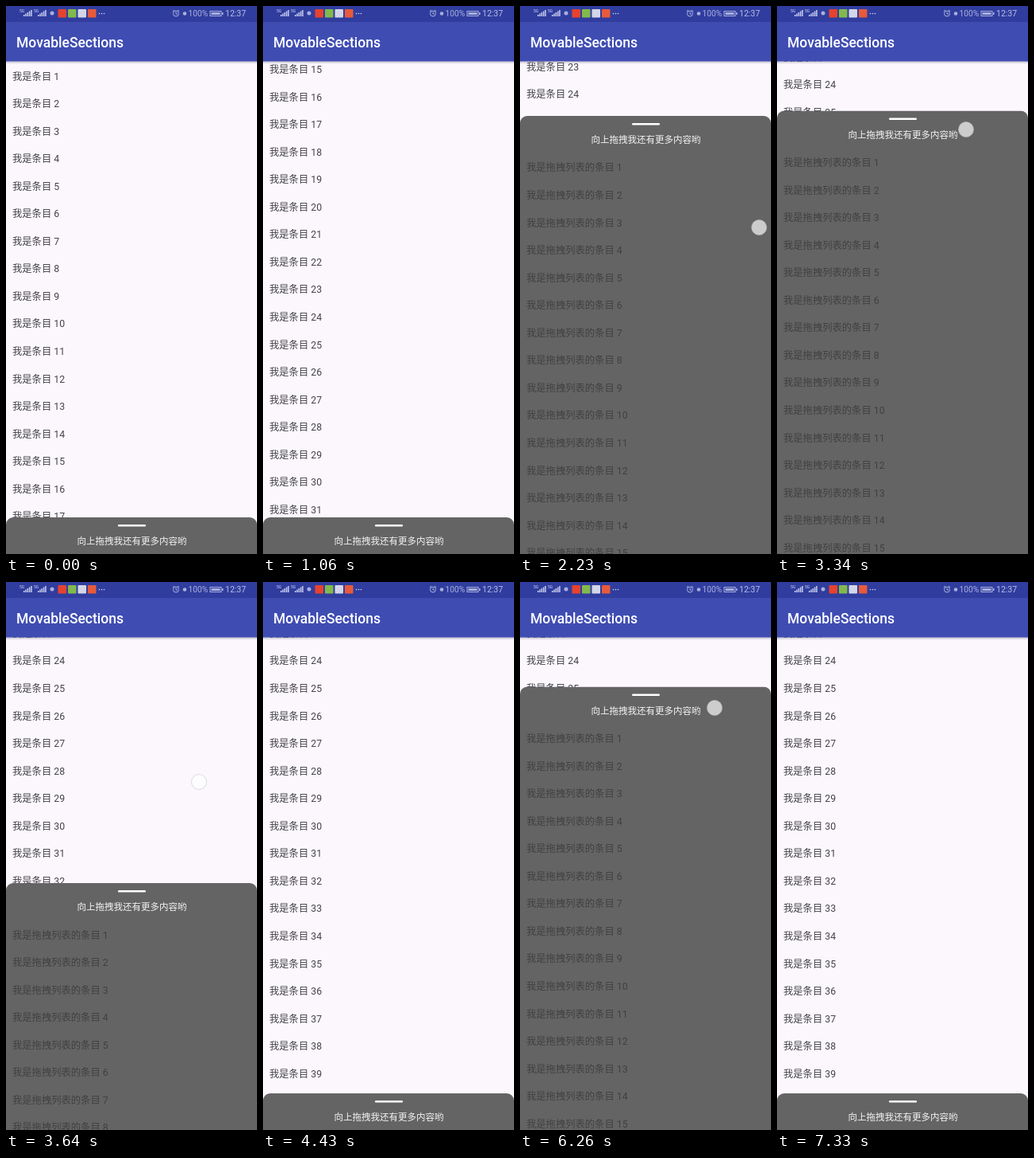
An HTML page with a canvas for the animation above (8000 ms loop, 316x688 px).

```html
<!DOCTYPE html>
<html lang="zh-CN">
<head>
<meta charset="utf-8">
<title>Draggable panel</title>
<style>
  html, body { margin: 0; width: 100%; height: 100%; overflow: hidden; background: #fbf7fd; }
  canvas { display: block; width: 316px; height: 688px; }
</style>
</head>
<body>
<canvas id="stage"></canvas>
<script>
const W = 316, H = 688, LOOP = 8000;
const ROW = 34.55;
const CLOSED = 642, HALF = 378, OPEN = 131.5;
const FONT = 'Roboto, "Noto Sans CJK SC", "Noto Sans CJK", sans-serif';

const canvas = document.getElementById('stage');
const ctx = canvas.getContext('2d');
const ratio = window.devicePixelRatio || 1;
canvas.width = W * ratio;
canvas.height = H * ratio;
ctx.scale(ratio, ratio);

const smooth = u => u * u * (3 - 2 * u);
const clamp = u => Math.max(0, Math.min(1, u));

// Eased interpolation through [time, value] keys.
function track(t, keys) {
  if (t <= keys[0][0]) return keys[0][1];
  for (let i = 1; i < keys.length; i++) {
    const [t0, v0] = keys[i - 1], [t1, v1] = keys[i];
    if (t < t1) return v0 + (v1 - v0) * smooth((t - t0) / (t1 - t0));
  }
  return keys[keys.length - 1][1];
}

const panelKeys = [
  [1560, CLOSED], [2230, 138], [2330, OPEN],
  [3340, OPEN], [3640, HALF],
  [4080, HALF], [4400, CLOSED],
  [4850, CLOSED], [5800, OPEN],
  [6260, OPEN], [7080, CLOSED]
];

// start, end of drag, end of fade, then the path of the finger
const touches = [
  { from: 1540, to: 2230, gone: 2450, a: [280, 668], b: [301, 278] },
  { from: 3340, to: 3600, gone: 3870, a: [238, 155], b: [243, 251] },
  { from: 4080, to: 4300, gone: 4400, a: [240, 405], b: [245, 520] },
  { from: 4850, to: 5600, gone: 5750, a: [250, 668], b: [272, 250] },
  { from: 6260, to: 6900, gone: 7040, a: [245, 158], b: [250, 520] }
];

// A quick swipe followed by a decaying fling.
function listScroll(t) {
  const end = 783.7, swipe = 231.9, tau = 415;
  if (t < 600) return 0;
  if (t < 800) return swipe * ((t - 600) / 200) ** 1.16;
  if (t > 2700) return end;
  const tail = Math.exp(-1900 / tau);
  const left = (Math.exp(-(t - 800) / tau) - tail) / (1 - tail);
  return end - (end - swipe) * left;
}

function rect(x, y, w, h, color, radius = 0) {
  ctx.fillStyle = color;
  ctx.beginPath();
  ctx.roundRect(x, y, w, h, radius);
  ctx.fill();
}

function circle(x, y, r, color) {
  ctx.fillStyle = color;
  ctx.beginPath();
  ctx.arc(x, y, r, 0, Math.PI * 2);
  ctx.fill();
}

function text(str, x, y, size, color, weight = 400, align = 'left') {
  ctx.font = `${weight} ${size}px ${FONT}`;
  ctx.textAlign = align;
  ctx.fillStyle = color;
  ctx.fillText(str, x, y);
}

function rows(label, firstY, color) {
  for (let n = Math.max(1, Math.floor((40 - firstY) / ROW)); n <= 40; n++) {
    const y = firstY + (n - 1) * ROW;
    if (y > H + 20) break;
    text(`${label} ${n}`, 8, y + 4.5, 12.3, color);
  }
}

function signal(x) {
  text('5G', x, 8, 5, '#d5d9f2');
  for (let i = 0; i < 5; i++) {
    const h = 2 + i * 1.5;
    rect(x + 5 + i * 2.3, 13 - h, 1.5, h, '#c9ceee');
  }
}

function drawBars() {
  const pale = '#a9b0de';
  const shade = ctx.createLinearGradient(0, 69, 0, 73);
  shade.addColorStop(0, 'rgba(60,60,90,.32)');
  shade.addColorStop(1, 'rgba(60,60,90,0)');
  rect(0, 69, W, 4, shade);
  rect(0, 20, W, 49.5, '#3f4db3');
  rect(0, 0, W, 20, '#303d9e');
  text('MovableSections', 13, 52, 17.5, '#fff', 500);

  signal(17);
  signal(35);
  circle(58, 9, 2.5, pale);
  rect(65.5, 4, 10.5, 10.5, '#e5432f', 1);
  rect(78, 4, 10.5, 10.5, '#83b94c', 1);
  rect(90.5, 4, 10.5, 10.5, '#d3d6e8', 1);
  rect(103, 4, 10.5, 10.5, '#e75a3b', 1);
  for (let i = 0; i < 3; i++) circle(117.5 + i * 3, 9.5, 0.8, '#d5d9f2');

  ctx.strokeStyle = pale;
  ctx.lineWidth = 1;
  ctx.beginPath();
  ctx.arc(214, 9.5, 3.5, 0, Math.PI * 2);
  ctx.moveTo(214, 7.5);
  ctx.lineTo(214, 10);
  ctx.lineTo(216, 10);
  ctx.moveTo(209.8, 6.8);
  ctx.lineTo(212, 5);
  ctx.moveTo(216, 5);
  ctx.lineTo(218.2, 6.8);
  ctx.stroke();
  circle(225, 9.5, 2.3, pale);
  text('100%', 229.5, 13, 10.2, pale);
  ctx.strokeRect(257, 6.5, 14, 6);
  rect(258.5, 8, 11, 3, pale);
  rect(272, 8, 1.5, 3, pale);
  text('12:37', 276, 13, 10.5, '#b9bfe6');
}

function drawPanel(top) {
  ctx.save();
  ctx.beginPath();
  ctx.roundRect(0, top, W, H - top + 20, 9);
  ctx.clip();
  rect(0, top, W, H - top, '#656465');
  rect(141, top + 9, 35, 2.6, '#fff', 1.3);
  text('向上拖拽我还有更多内容哟', 158.5, top + 34, 11.5, '#f4f4f4', 400, 'center');
  rows('我是拖拽列表的条目', top + 65, '#414041');
  ctx.restore();
}

function drawTouch(t) {
  for (const { from, to, gone, a, b } of touches) {
    if (t < from || t > gone) continue;
    const u = smooth(clamp((t - from) / (to - from)));
    const x = a[0] + (b[0] - a[0]) * u;
    const y = a[1] + (b[1] - a[1]) * u;
    ctx.globalAlpha = 1 - clamp((t - to) / (gone - to));
    circle(x, y, 9.5, 'rgba(255,255,255,.68)');
    ctx.strokeStyle = 'rgba(190,188,192,.6)';
    ctx.lineWidth = 1;
    ctx.stroke();
    ctx.globalAlpha = 1;
  }
}

function frame(now) {
  const t = now % LOOP;
  rect(0, 0, W, H, '#fbf7fd');
  rows('我是条目', 88 - listScroll(t), '#454347');
  drawBars();
  drawPanel(track(t, panelKeys));
  drawTouch(t);
  requestAnimationFrame(frame);
}
requestAnimationFrame(frame);
</script>
</body>
</html>
```
